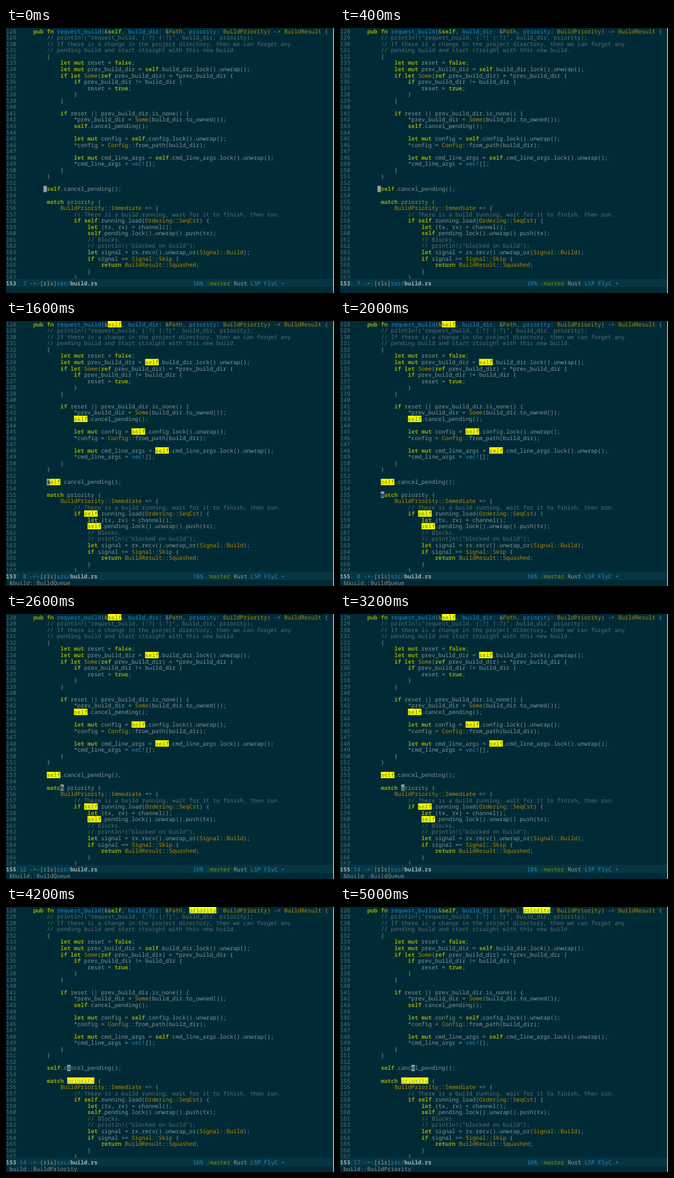
Animation of 600x485 px, one loop 5.2 s. Source, as an HTML page:

```html
<!DOCTYPE html>
<html lang="en">
<head>
<meta charset="utf-8">
<title>Editor session</title>
<style>
html, body { margin: 0; width: 100%; height: 100%; overflow: hidden; background: #002b36; }
svg { display: block; width: 100vw; height: 100vh; }
text {
  font: 10.333px "Noto Sans Mono", "DejaVu Sans Mono", monospace;
  white-space: pre;
  text-rendering: geometricPrecision;
  fill: #839496;
}
.dim { fill: #586e75; }
.key { fill: #94a600; font-weight: 700; }
.type { fill: #b58900; }
.name { fill: #268bd2; }
.branch { fill: #859900; }
.strong { fill: #a9b5b5; font-weight: 700; }
.light { fill: #93a1a1; }
.inverse { fill: #002b36; }
</style>
</head>
<body>
<svg id="stage" viewBox="0 0 600 485" preserveAspectRatio="none"></svg>
<script>
const SOURCE = `    pub fn request_build(&self, build_dir: &Path, priority: BuildPriority) -> BuildResult {
        // println!("request_build, {:?} {:?}", build_dir, priority);
        // If there is a change in the project directory, then we can forget any
        // pending build and start straight with this new build.
        {
            let mut reset = false;
            let mut prev_build_dir = self.build_dir.lock().unwrap();
            if let Some(ref prev_build_dir) = *prev_build_dir {
                if prev_build_dir != build_dir {
                    reset = true;
                }
            }

            if reset || prev_build_dir.is_none() {
                *prev_build_dir = Some(build_dir.to_owned());
                self.cancel_pending();

                let mut config = self.config.lock().unwrap();
                *config = Config::from_path(build_dir);

                let mut cmd_line_args = self.cmd_line_args.lock().unwrap();
                *cmd_line_args = vec![];
            }
        }

        self.cancel_pending();

        match priority {
            BuildPriority::Immediate => {
                // There is a build running, wait for it to finish, then run.
                if self.running.load(Ordering::SeqCst) {
                    let (tx, rx) = channel();
                    self.pending.lock().unwrap().push(tx);
                    // Blocks.
                    // println!("blocked on build");
                    let signal = rx.recv().unwrap_or(Signal::Build);
                    if signal == Signal::Skip {
                        return BuildResult::Squashed;
                    }
                }`.split("\n");

const FIRST = 128, LEFT = 25.1, TOP = 0.1, CHAR = 6.2, ROW = 11.55, BASE = 9.6;
const LOOP = 5200, STEP = 200;

// [start ms, line, column]
const MOVES = [
  [0, 153, 7], [600, 153, 8], [1800, 154, 0], [2000, 155, 8], [2200, 155, 9],
  [2400, 155, 11], [2600, 155, 12], [2800, 155, 13], [3000, 155, 14],
  [4000, 154, 0], [4200, 153, 14], [4600, 153, 15], [4800, 153, 16], [5000, 153, 17]
];
// [start ms, highlighted word, echoed type]
const HOVERS = [
  [0, "", ""], [1200, "self", "&build::BuildQueue"], [3400, "priority", "build::BuildPriority"]
];

const stage = document.getElementById("stage");
const colX = col => LEFT + col * CHAR;
const rowY = line => TOP + (line - FIRST) * ROW;

function add(tag, attrs, parent = stage) {
  const el = document.createElementNS("http://www.w3.org/2000/svg", tag);
  for (const k in attrs) el.setAttribute(k, attrs[k]);
  return parent.appendChild(el);
}

function write(str, x, y, cls = "") {
  const el = add("text", { x, y, class: cls });
  el.textContent = str;
  return el;
}

const box = (x, y, width, height, fill, parent) =>
  add("rect", { x, y, width, height, fill }, parent);

const RULES = [
  ["dim", /\/\/.*/],
  ["key", /\b(?:pub|fn|self|let|mut|if|ref|match|return|true|false)\b/],
  ["type", /\b[A-Z]\w*/],
  ["name", /vec!|request_build|\w+(?=: )/],
  ["", /\w+|[^\w\s]+?(?=\w|\s|\/\/|$)/]
];
const LEXER = new RegExp(RULES.map(r => `(${r[1].source})`).join("|"), "g");

const tokens = SOURCE.flatMap((code, i) =>
  [...code.matchAll(LEXER)].map(m => ({
    str: m[0], line: FIRST + i, col: m.index,
    cls: RULES[m.slice(1).findIndex(g => g !== undefined)][0]
  })));

box(0, 0, 600, 485, "#002b36");

const marks = {};
for (const [, word] of HOVERS.slice(1)) {
  marks[word] = add("g", {});
  for (const t of tokens)
    if (t.str === word)
      box(colX(t.col), rowY(t.line), word.length * CHAR, ROW, "#ffff00", marks[word]);
}

SOURCE.forEach((_, i) => write(FIRST + i, 0, rowY(FIRST + i) + BASE, "dim"));
for (const t of tokens) write(t.str, colX(t.col), rowY(t.line) + BASE, t.cls);

const block = box(0, 0, CHAR, ROW, "#93a1a1");
const under = write("", 0, 0, "inverse");

box(0, 459, 600, 15, "#073642");
box(598.5, 0, 1.5, 485, "#c4cccc");

const BAR = 470.8;
const lineNo = write("", 0, BAR, "strong");
const colNo = write("", 3 * CHAR, BAR, "name");
[
  ["-×-", 43.4, "name"], ["[rls]", 62, "light"], ["src/", 93, "name"],
  ["build.rs", 117.8, "strong"], ["16%", 342, "name"], [":master", 366.8, "branch"],
  ["Rust", 416.4, "light"], ["LSP FlyC +", 447.4, "name"]
].forEach(([str, x, cls]) => write(str, x, BAR, cls));
const echo = write("", CHAR, 482.6);

const at = (list, t) => list.filter(e => e[0] <= t).pop();

function draw(t) {
  const [, line, col] = at(MOVES, t);
  const [, word, info] = at(HOVERS, t);
  const x = colX(col), y = rowY(line);

  block.setAttribute("x", x);
  block.setAttribute("y", y);
  under.setAttribute("x", x);
  under.setAttribute("y", y + BASE);
  under.textContent = SOURCE[line - FIRST][col] || "";
  const token = tokens.find(k => k.line === line && col >= k.col && col < k.col + k.str.length);
  under.style.fontWeight = token && token.cls === "key" ? 700 : 400;

  lineNo.textContent = line;
  colNo.textContent = ":" + String(col).padStart(2);
  echo.textContent = info;
  for (const w in marks) marks[w].style.display = w === word ? "" : "none";
}

const start = performance.now();
function tick() {
  const t = (performance.now() - start) % LOOP;
  draw(Math.floor(t / STEP) * STEP);
  requestAnimationFrame(tick);
}
tick();
</script>
</body>
</html>
```
